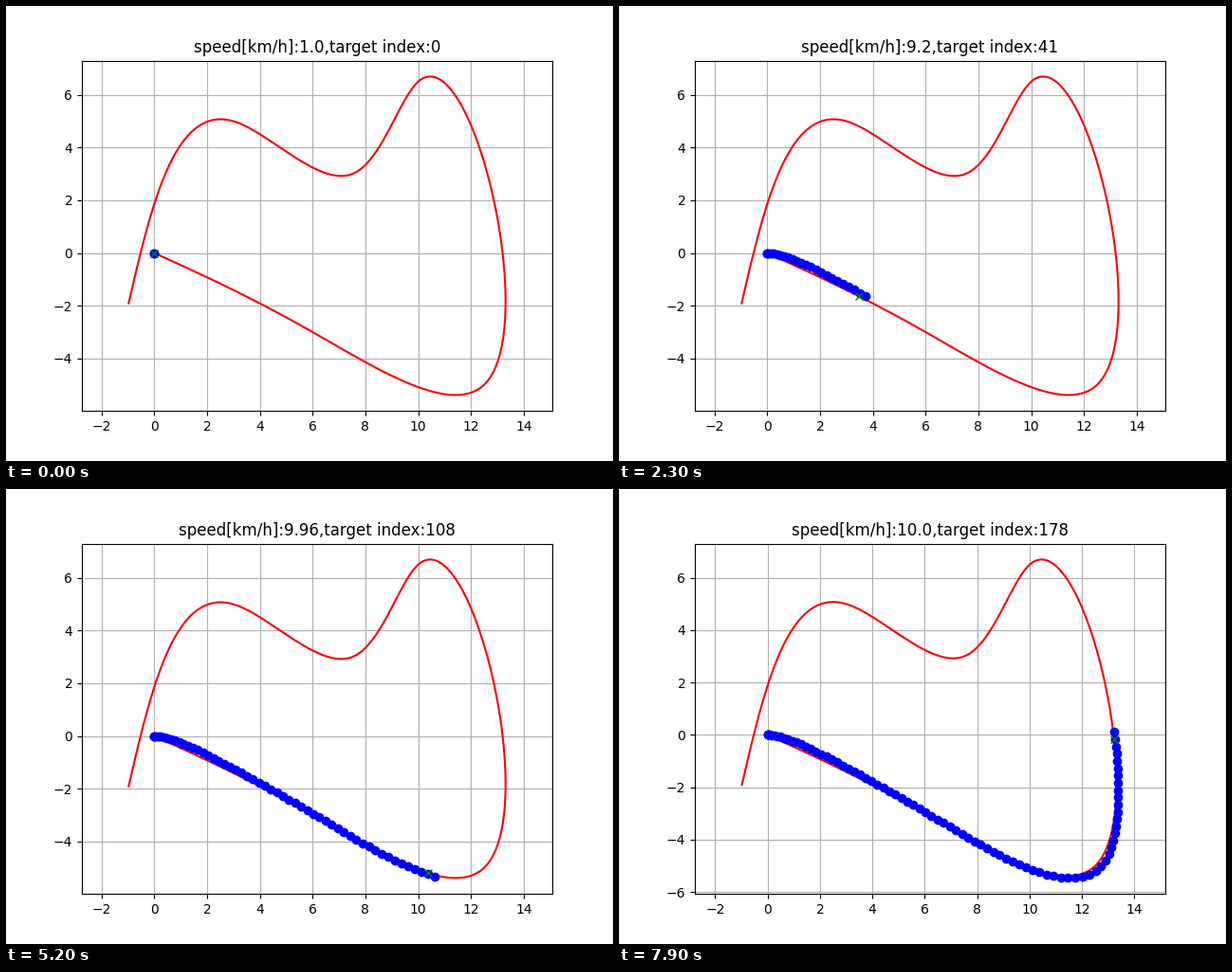
A matplotlib script for the animation above (8 s loop, 640 px wide and 480 px high).

```python
import math

import numpy as np
import matplotlib.pyplot as plt
from matplotlib.animation import FuncAnimation

FRAMES = 80
DT = 0.1            # simulation step [s]
WHEELBASE = 0.5     # [m]
MAX_STEER = math.radians(45)
CRUISE = 10 / 3.6   # [m/s]

WAY_X = np.array([0.0, 6.0, 12.5, 10.0, 7.5, 3.0, -1.0])
WAY_Y = np.array([0.0, -3.0, -5.0, 6.5, 3.0, 5.0, -2.0])


def wrap(angle):
    return (angle + math.pi) % (2 * math.pi) - math.pi


def spline(knots, a, s):
    """Natural cubic spline: value, first and second derivative at s."""
    h = np.diff(knots)
    n = len(knots)
    m = np.eye(n)
    rhs = np.zeros(n)
    for i in range(1, n - 1):
        m[i, i - 1:i + 2] = h[i - 1], 2 * (h[i - 1] + h[i]), h[i]
        rhs[i] = 3 * ((a[i + 1] - a[i]) / h[i] - (a[i] - a[i - 1]) / h[i - 1])
    c = np.linalg.solve(m, rhs)
    d = np.diff(c) / (3 * h)
    b = np.diff(a) / h - h * (c[1:] + 2 * c[:-1]) / 3

    i = np.clip(np.searchsorted(knots, s, side="right") - 1, 0, n - 2)
    t = s - knots[i]
    value = a[i] + b[i] * t + c[i] * t**2 + d[i] * t**3
    return value, b[i] + 2 * c[i] * t + 3 * d[i] * t**2, 2 * c[i] + 6 * d[i] * t


def make_course(step=0.1):
    knots = np.r_[0, np.cumsum(np.hypot(np.diff(WAY_X), np.diff(WAY_Y)))]
    s = np.arange(0, knots[-1], step)
    x, dx, ddx = spline(knots, WAY_X, s)
    y, dy, ddy = spline(knots, WAY_Y, s)
    curvature = (ddy * dx - ddx * dy) / (dx**2 + dy**2) ** 1.5
    return x, y, np.arctan2(dy, dx), curvature


def lqr_gain(v):
    A = np.zeros((4, 4))
    A[0, 0] = A[2, 2] = 1
    A[0, 1] = A[2, 3] = DT
    A[1, 2] = v
    B = np.array([[0], [0], [0], [v / WHEELBASE]])
    Q, R = np.eye(4), np.eye(1)
    X = Q
    for _ in range(150):
        gain = np.linalg.inv(R + B.T @ X @ B) @ B.T @ X @ A
        last, X = X, A.T @ X @ A - A.T @ X @ B @ gain + Q
        if abs(X - last).max() < 0.01:
            break
    return np.linalg.inv(R + B.T @ X @ B) @ B.T @ X @ A


def drive(steps):
    """Follow the course; return positions, speeds and nearest indices."""
    x = y = yaw = v = 0.0
    last_e = last_th = 0.0
    xs, ys, speeds, nearest = [x], [y], [], []
    for _ in range(steps):
        dist = np.hypot(x - cx, y - cy)
        ind = int(dist.argmin())
        e = dist[ind]
        if wrap(cyaw[ind] - math.atan2(cy[ind] - y, cx[ind] - x)) < 0:
            e = -e
        th = wrap(yaw - cyaw[ind])
        error = np.array([e, (e - last_e) / DT, th, (th - last_th) / DT])
        feedback = wrap(-(lqr_gain(v) @ error)[0])
        steer = math.atan(WHEELBASE * ck[ind]) + feedback
        steer = max(-MAX_STEER, min(MAX_STEER, steer))
        last_e, last_th = e, th

        x += v * math.cos(yaw) * DT
        y += v * math.sin(yaw) * DT
        yaw += v / WHEELBASE * math.tan(steer) * DT
        v += (CRUISE - v) * DT

        xs.append(x)
        ys.append(y)
        speeds.append(float(v * 3.6))
        nearest.append(ind)
    return xs, ys, speeds, nearest


cx, cy, cyaw, ck = make_course()
xs, ys, speeds, nearest = drive(FRAMES)

fig, ax = plt.subplots(figsize=(6.4, 4.8), dpi=100)


def draw(i):
    ax.cla()
    k = nearest[i]
    ax.plot(cx, cy, "-r")
    ax.plot(xs[:i + 2], ys[:i + 2], "ob")
    ax.plot(cx[k], cy[k], "xg")
    ax.axis("equal")
    ax.grid(True)
    ax.set_title(f"speed[km/h]:{round(speeds[i], 2)},target index:{k}")


anim = FuncAnimation(fig, draw, frames=FRAMES, init_func=lambda: draw(0),
                     interval=100, repeat=True, repeat_delay=0)
plt.show()
```
